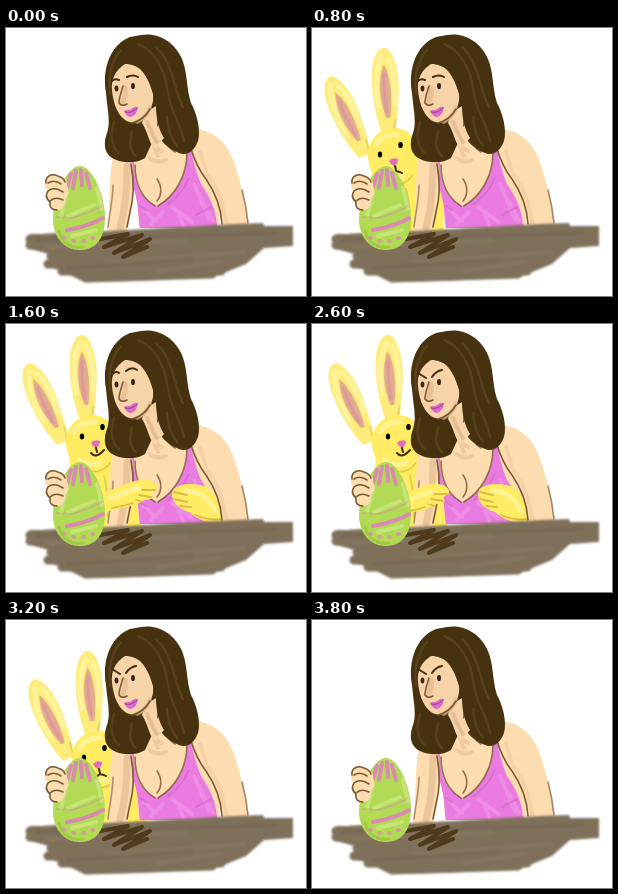
Animation of 300x268 px, one loop 4800 ms. Source, as an HTML page:

```html
<!DOCTYPE html>
<html lang="en">
<head>
<meta charset="utf-8">
<title>Easter bunny</title>
<style>
html, body { margin: 0; width: 100%; height: 100%; overflow: hidden; background: #fff; }
svg { display: block; width: 100vw; height: 100vh; }
path, ellipse { stroke-linecap: round; stroke-linejoin: round; }
.line { fill: none; stroke: #7b5a34; stroke-width: 1.6; }
.brow, .ink { fill: none; stroke: #432b15; stroke-width: 2; }
.skin { fill: #fddcb0; }
.face-skin { fill: #f7d4a8; }
.shade { fill: none; stroke: #d9b084; }
.fur { fill: #ffec62; }
.wash { fill: none; stroke: #fff5a8; stroke-width: 5; opacity: .7; }
.gold { fill: none; stroke: #d9bd45; stroke-width: 1.8; }
.hair { fill: #46320f; }
.lock { fill: none; stroke: #5d4822; stroke-width: 2.5; opacity: .7; }
.pink { fill: none; stroke: #d88ab0; }
.soft { filter: blur(.5px); }
.table { filter: blur(1.3px); }

/* One loop; poses change every 100 ms. */
.bunny, .ear, .face, .paw, .swap { animation: 4.8s step-end infinite; }
.bunny { animation-name: rise; }
.ear.l { animation-name: ear-l; }
.ear.r { animation-name: ear-r; }
.face { animation-name: face; }
.paw.l { animation-name: paw-l; }
.paw.r { animation-name: paw-r; }
.calm { animation-name: calm; }
.raised { animation-name: raised; }
.angry { animation-name: angry; }
.frown { animation-name: frown; }
.smile { animation-name: smile; }

@keyframes rise {
  0% { transform: translate(0, 200px); }
  2.083% { transform: translate(11px, 118px); animation-timing-function: steps(3); }
  8.333% { transform: translate(11px, 73px); animation-timing-function: steps(2); }
  12.5% { transform: translate(9px, 27px); animation-timing-function: steps(2); }
  16.667% { transform: translate(-4px, 9px); animation-timing-function: steps(4); }
  25%, 54.167% { transform: translate(0, 0); animation-timing-function: steps(5); }
  64.583% { transform: translate(-4px, 8px); }
  66.667% { transform: translate(6px, 20px); animation-timing-function: steps(5); }
  77.083% { transform: translate(11px, 118px); }
  79.167%, 100% { transform: translate(0, 200px); }
}
@keyframes ear-l {
  0%, 8.333% { transform: rotate(24deg); animation-timing-function: steps(2); }
  12.5%, 66.667% { transform: rotate(0deg); animation-timing-function: steps(5); }
  77.083%, 100% { transform: rotate(24deg); }
}
@keyframes ear-r {
  0%, 8.333% { transform: rotate(9deg); animation-timing-function: steps(2); }
  12.5%, 66.667% { transform: rotate(0deg); animation-timing-function: steps(5); }
  77.083%, 100% { transform: rotate(9deg); }
}
@keyframes face {
  0%, 16.667% { transform: translate(-4px, 5px); animation-timing-function: steps(4); }
  25%, 54.167% { transform: translate(0, 0); animation-timing-function: steps(5); }
  64.583%, 100% { transform: translate(-4px, 5px); }
}
@keyframes paw-l {
  0%, 20.833% { transform: translate(-56px, 8px); animation-timing-function: steps(5); }
  31.25% { transform: translate(0, 0); }
  54.167% { transform: translate(-14px, 4px); animation-timing-function: steps(5); }
  64.583%, 100% { transform: translate(-56px, 8px); }
}
@keyframes paw-r {
  0%, 20.833% { transform: translate(62px, 24px); animation-timing-function: steps(5); }
  31.25%, 54.167% { transform: translate(0, 0); animation-timing-function: steps(5); }
  64.583%, 100% { transform: translate(62px, 24px); }
}
@keyframes calm { 0% { opacity: 1; } 29.167% { opacity: 0; } 41.667% { opacity: 1; } 43.75%, 100% { opacity: 0; } }
@keyframes raised { 0% { opacity: 0; } 29.167% { opacity: 1; } 41.667%, 100% { opacity: 0; } }
@keyframes angry { 0% { opacity: 0; } 43.75%, 100% { opacity: 1; } }
@keyframes frown { 0% { opacity: 1; } 22.917% { opacity: 0; } 60.417%, 100% { opacity: 1; } }
@keyframes smile { 0% { opacity: 0; } 22.917% { opacity: 1; } 60.417%, 100% { opacity: 0; } }
</style>
</head>
<body>
<svg viewBox="0 0 300 268" preserveAspectRatio="none">
  <defs>
    <clipPath id="above"><path d="M0 0H300V206H0Z"/></clipPath>
    <clipPath id="left-reach"><path d="M99 100H200V206H99Z"/></clipPath>
    <clipPath id="right-reach"><path d="M120 100H218V206H120Z"/></clipPath>
    <clipPath id="egg"><path id="shell" d="M74 138C86 138 99 166 99 190C99 210 90 222 74 222C58 222 47 209 47 191C47 167 61 138 74 138Z"/></clipPath>
    <g id="ear">
      <path d="M-6 4C-13 -18 -15 -42 -13 -60C-11 -76 -4 -84 2 -82C10 -78 14 -58 13 -42C12 -24 9 -8 7 4Z" fill="#fdec79"/>
      <path class="wash" d="M-8 -24C-11 -42 -9 -63 -2 -74M8 -26C10 -42 9 -60 4 -71"/>
      <path d="M-1 -12C-7 -30 -8 -50 -1 -66C6 -54 6 -28 3 -12Z" fill="#e2ab8b"/>
      <path class="pink" d="M0 -18C-2 -32 -2 -44 -1 -56" stroke-width="3" opacity=".6"/>
      <path class="gold" d="M6 0L8 -10" opacity=".6"/>
    </g>
  </defs>

  <g class="soft" clip-path="url(#above)">
    <g class="bunny">
      <g transform="translate(55 115) rotate(-24)"><g class="ear l"><use href="#ear"/></g></g>
      <g transform="translate(80 93) rotate(-3)"><g class="ear r"><use href="#ear"/></g></g>
      <path class="fur" d="M64 130C80 120 110 118 135 125V212H60Z"/>
      <path class="fur" d="M60 121C58 106 70 92 84 91C100 90 110 102 110 119C110 138 100 148 86 148C72 148 62 139 60 121Z"/>
      <path class="wash" d="M68 108C72 101 80 97 89 98M73 136C80 141 87 142 94 139"/>
      <path class="gold" d="M84 147C91 149 99 146 104 139M98 152C102 164 101 178 102 192" opacity=".7"/>
      <g class="face">
        <ellipse cx="76" cy="112.5" rx="2.2" ry="3"/>
        <ellipse cx="96.5" cy="103" rx="2.3" ry="3.1"/>
        <path d="M85 119Q88 115 94 117Q94 122 90 124Q87 123 85 119Z" fill="#e36cba"/>
        <path class="ink swap frown" d="M91 124L92 128M89 132Q91 127 98 131" stroke-width="1.6"/>
        <path class="ink swap smile" d="M90 124L91 128M85 129Q90 135 98 126" stroke-width="1.6"/>
      </g>
    </g>
  </g>

  <g class="soft">
    <!-- torso -->
    <path class="skin" d="M125 130C138 122 142 112 144 100H158C164 110 178 105 194 101C207 112 214 150 214 200H133C133 178 126 150 125 130Z"/>
    <path class="shade" d="M142 107C146 116 151 121 156 123M148 119L152 128M144 130Q152 136 160 132" stroke-width="4" opacity=".4"/>
    <path class="line" d="M151 151C156 158 156 167 151 173M157 108C160 116 164 121 169 124" opacity=".85"/>
    <path d="M124 132L128 133C128 152 131 168 150 178C168 169 181 152 181 122L184 117C187 132 190 144 195 156C204 169 211 183 211 200H134C132 188 133 177 128 162Z" fill="#ea7be0"/>
    <path d="M138 182L150 193M145 196L157 184M166 179L186 194M188 156L203 191M173 187L177 197M196 173L207 192" fill="none" stroke="#f19aea" stroke-width="4" opacity=".55"/>
    <path d="M134 178L140 182M162 176C172 169 179 160 183 150M190 187L205 179" fill="none" stroke="#cd68c6" stroke-width="2" opacity=".6"/>
    <path class="line" d="M129 137C129 154 134 169 149 178M181 124C181 148 169 168 152 178" opacity=".8"/>

    <g clip-path="url(#right-reach)"><g class="paw r">
      <path class="fur" d="M167 166C172 160 184 159 194 161C207 163 214 176 217 200C203 200 190 195 183 188C173 185 163 177 167 166Z"/>
      <path class="wash" d="M180 167C193 167 203 174 209 187"/>
      <path class="gold" d="M168 168L181 171M168 175L181 178M174 182L185 183M189 191C198 195 207 196 216 195"/>
    </g></g>

    <!-- arms -->
    <path class="skin" d="M187 102C201 100 215 109 223 123C232 140 238 168 243 200H217C216 180 208 164 199 151C191 139 186 118 187 102Z"/>
    <path class="shade" d="M201 146C211 158 217 176 220 194M194 123L200 143" stroke-width="4" opacity=".25"/>
    <path class="line" d="M184 118C187 128 192 141 200 151C209 164 215 179 216 196"/>
    <path class="line" d="M236 162C239 173 241 185 242 195" opacity=".7"/>
    <path class="skin" d="M107 128C114 130 122 131 126 134C128 158 127 180 121 203H101C105 180 102 151 107 128Z"/>
    <path class="shade" d="M121 138C121 160 119 182 114 199" stroke-width="7" opacity=".5"/>
    <path class="line" d="M125 136C128 153 128 170 124 184L121 199"/>
    <path class="line" d="M107 157C107 172 103 188 102 199" opacity=".6"/>

    <g clip-path="url(#left-reach)"><g class="paw l">
      <path class="fur" d="M94 169C108 167 120 158 134 156C144 155 153 160 151 166C147 167 144 169 147 173C143 177 139 175 137 177C128 183 111 184 94 190Z"/>
      <path class="wash" d="M104 174C114 172 124 165 133 164"/>
      <path class="gold" d="M149 166L136 166M145 173L133 171M137 178L130 176M106 184C114 183 121 181 127 179"/>
    </g></g>

    <!-- head -->
    <path class="hair" d="M135 7C152 4 169 14 176 31C182 46 180 59 185 75C191 86 195 102 192 113C188 124 180 128 173 125C161 120 154 113 151 104C147 113 143 121 139 130C132 135 118 136 108 131C98 126 97 116 101 105C105 94 101 79 100 65C96 44 103 17 124 9Z"/>
    <path class="face-skin" d="M119 36C132 36 143 46 146 59C148 68 148 76 143 83C139 94 128 98 119 92C110 85 107 73 106 62C105 52 109 42 119 36Z"/>
    <path class="face-skin" d="M139 85L150 78C150 91 153 102 158 110L149 121C143 116 142 104 136 95Z"/>
    <path class="shade" d="M141 94C144 101 147 108 151 114M132 94Q140 90 144 80" stroke-width="4" opacity=".6"/>
    <path class="shade" d="M119 60C120 66 118 72 116 76" stroke-width="5" opacity=".5"/>
    <path class="hair" d="M120 33C132 35 142 47 147 66C150 80 153 87 151 99L165 80L151 28L128 13Z"/>
    <path class="lock" d="M132 16C152 24 159 44 162 65S174 93 178 113M150 19C168 36 167 61 177 79M115 22C105 34 102 47 104 66M108 94C104 106 105 119 113 125M126 104C123 114 124 123 130 128M161 89C162 102 166 112 171 118"/>
    <path class="line" d="M117 58C115 65 113 70 113 75Q116 79 121 76M126 95Q138 92 144 81"/>
    <ellipse cx="110.5" cy="60.5" rx="1.9" ry="3" fill="#36261b"/>
    <ellipse cx="127" cy="58" rx="2" ry="3.1" fill="#36261b"/>
    <path d="M118 83Q121 81 124 82Q128 78 132 79Q131 87 125 89Q121 89 118 83Z" fill="#dc68ca"/>
    <path d="M119 84Q125 86 131 80" fill="none" stroke="#9a3f87" stroke-width="1"/>
    <path class="brow swap calm" d="M106 53Q109 50 113 52M121 49Q127 46 132 49"/>
    <path class="brow swap raised" d="M105 52Q109 46 113 49M120 47Q126 42 131 46"/>
    <path class="brow swap angry" d="M106 49L114 54M120 53Q124 47 130 46"/>
  </g>

  <!-- table -->
  <g class="table">
    <path d="M24 206C82 206 190 197 257 195L258 198H287V218L258 220L240 236L208 249L130 253L78 254L56 243L46 240L58 230L24 221Z" fill="#7f705a"/>
    <g fill="none" stroke="#7f705a" stroke-width="9">
      <path d="M24 211L245 201M24 217L240 215M45 228L246 223M42 236L233 232M56 243L215 243M80 250L206 246"/>
      <path d="M42 219L180 212M100 235L238 224M152 243L212 234" stroke="#8b7c66" stroke-width="4" opacity=".5"/>
      <path d="M31 212L270 205M62 240L187 231" stroke="#726450" stroke-width="4" opacity=".5"/>
    </g>
  </g>
  <path class="soft" d="M94 211L122 206L98 219L136 207L108 225L144 211L117 229L141 219" fill="none" stroke="#503a1c" stroke-width="4"/>

  <!-- egg -->
  <g class="soft">
    <use href="#shell" fill="#b3da54"/>
    <g clip-path="url(#egg)">
      <path d="M61 164L55 188M91 160L96 181M62 188L88 177M66 208L90 202" fill="none" stroke="#c6e376" stroke-width="4"/>
      <path class="pink" d="M65 146L61 159M70 143L67 160M75 142L76 157M80 145L84 160" stroke-width="4"/>
      <path class="pink" d="M61 202C73 200 87 196 97 190" stroke-width="4"/>
      <path class="pink" d="M51 189L66 190L82 185L96 178" stroke-width="1.5" opacity=".5"/>
      <path class="pink" d="M58 210h1M67 213h1M77 213h1M86 210h1" stroke-width="4" opacity=".7"/>
      <path d="M53 203C56 216 67 221 77 219" fill="none" stroke="#98bd42" stroke-width="3" opacity=".6"/>
    </g>
  </g>

  <!-- hand -->
  <g class="soft">
    <path class="skin" d="M40 155C39 148 46 145 52 148C58 149 62 153 61 158C64 163 62 168 59 171C60 178 55 183 50 182C45 182 43 179 44 174C39 171 39 166 42 163C39 160 38 157 40 155Z"/>
    <path class="line" d="M40 155C39 148 46 145 52 148Q58 150 59 154M42 155Q48 151 55 156M42 163Q48 158 57 164M44 173Q49 168 57 172M42 163Q38 169 44 174Q43 182 51 182" stroke-width="1.3"/>
  </g>
</svg>
</body>
</html>
```
